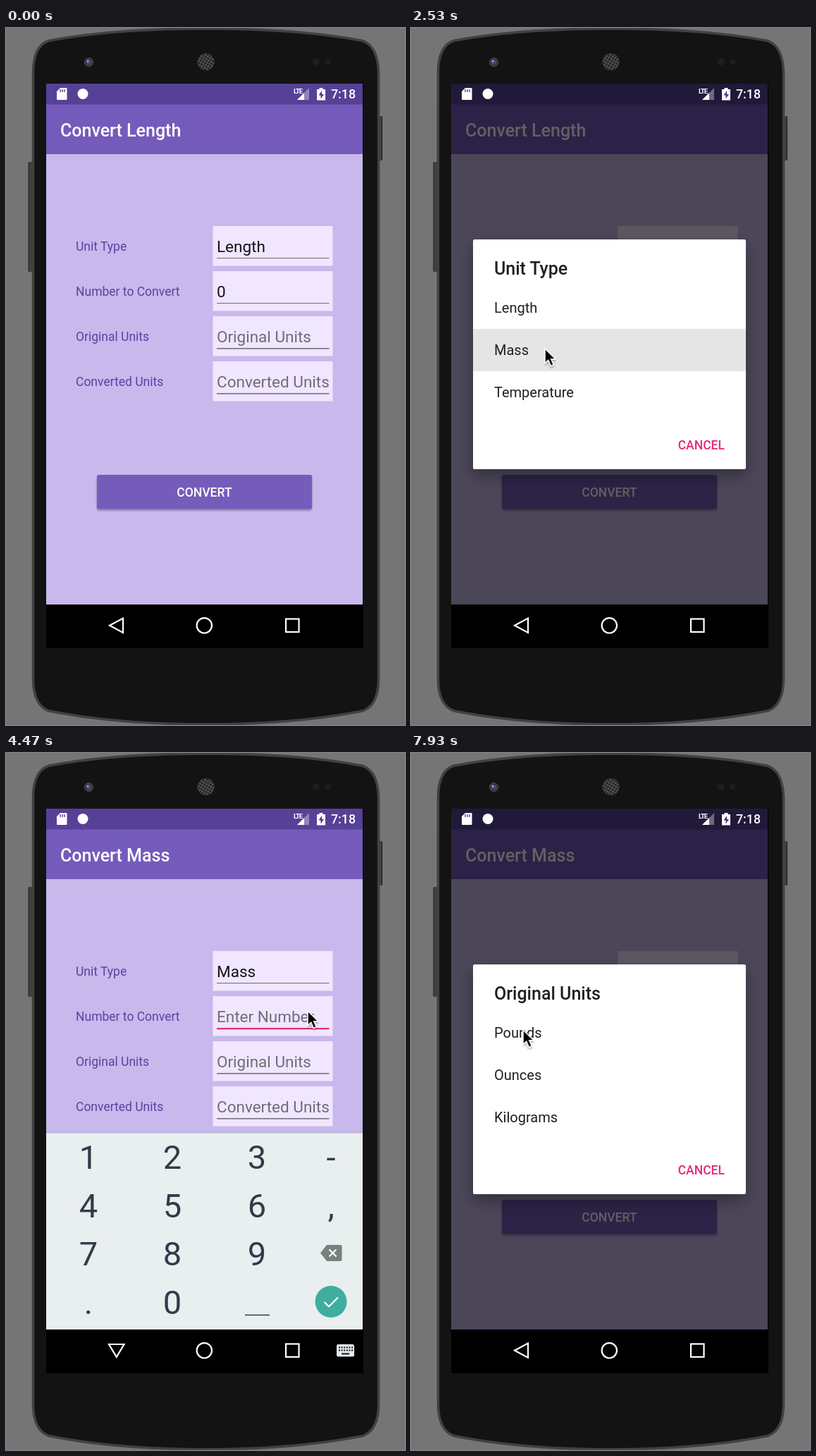
Recreate the animation shown at these times as an HTML page. Size 566 by 989 pixels, loop 8000 ms.

```html
<!DOCTYPE html>
<html lang="en">
<head>
<meta charset="utf-8">
<title>Unit converter</title>
<style>
  html, body { margin: 0; width: 100%; height: 100%; overflow: hidden; background: #757575; }
  svg { display: block; font-family: Roboto, sans-serif; }
  .medium { font-weight: 500; }
  .mid { text-anchor: middle; }
  .label { font-size: 17.5px; fill: #5a42a2; }
  .value { font-size: 22.5px; fill: #151418; }
  .hint { fill: #716c78; }
  .title { font-size: 25px; font-weight: 500; }
  .item { font-size: 20px; fill: #202020; }
  .button { font-size: 17.5px; font-weight: 500; }
  .key { font-size: 47px; fill: #303c4a; text-anchor: middle; }
  .line { fill: none; stroke: #fff; stroke-width: 2.2; }
</style>
</head>
<body>
<svg width="566" height="989" viewBox="0 0 566 989">
  <defs>
    <pattern id="mesh" width="4" height="4" patternUnits="userSpaceOnUse" patternTransform="rotate(30)">
      <rect width="4" height="4" fill="#4c4c4c"/><circle cx="2" cy="2" r="1.3" fill="#161616"/>
    </pattern>
    <linearGradient id="side"><stop stop-color="#25262a"/><stop offset=".5" stop-color="#4a4b50"/><stop offset="1" stop-color="#1d1d20"/></linearGradient>
    <filter id="lift" x="-20%" y="-20%" width="140%" height="150%"><feDropShadow dx="0" dy="10" stdDeviation="11" flood-opacity=".32"/></filter>
    <filter id="low" x="-5%" y="-20%" width="110%" height="150%"><feDropShadow dx="0" dy="2" stdDeviation="1.5" flood-opacity=".35"/></filter>
    <clipPath id="screen"><rect x="57" y="79" width="450" height="801"/></clipPath>
  </defs>

  <rect width="566" height="989" fill="#757575"/>
  <rect x="31.5" y="190" width="7" height="156" rx="1.5" fill="url(#side)"/>
  <rect x="528" y="125" width="6" height="63" rx="1.5" fill="url(#side)"/>
  <path d="M38.5 62Q39 25 61 18Q150 1 283 1T505 18Q527 25 528.5 62V925Q528 961 506 969Q410 988 283 988T61 969Q39 961 38.5 925Z" fill="#131313" stroke="#414141" stroke-width="3.5"/>
  <circle cx="117.500" cy="48.500" r="6" fill="#343438" stroke="#555" stroke-width="1"/>
  <circle cx="117.500" cy="48.500" r="3.500" fill="#4b4578"/><circle cx="116" cy="47" r="1.500" fill="#aaa6c8"/>
  <circle cx="283.500" cy="48" r="12" fill="url(#mesh)"/>
  <g fill="#211c1d"><circle cx="440" cy="48" r="5"/><circle cx="456" cy="48" r="4"/></g>

  <g clip-path="url(#screen)">
    <rect x="57" y="79" width="451" height="801"/>
    <rect x="57" y="79" width="449" height="739" fill="#c8b8ec"/>
    <rect x="57" y="79" width="449" height="30" fill="#564197"/>
    <rect x="57" y="108.500" width="449" height="70.500" fill="#745bbb"/>
    <text id="heading" class="title" x="77" y="153.500" fill="#fff"></text>
    <g id="form"></g>
    <rect x="129" y="634" width="305" height="48.500" rx="2.500" fill="#745bbb" filter="url(#low)"/>
    <text class="button mid" x="281.500" y="664.500" fill="#fff">CONVERT</text>
    <rect id="dim" x="57" y="79" width="449" height="739"/>

    <g fill="#fff">
      <path d="M77 85H85.500Q86.500 85 86.500 86V101Q86.500 102 85.500 102H73Q72 102 72 101V90Z"/>
      <path d="M77 87v4M80 87v4M83 87v4" stroke="#564197" stroke-width="1.400"/>
      <circle cx="109" cy="93.500" r="7.500"/>
      <text x="408" y="93" font-size="9.500" font-weight="700" letter-spacing="-1.200">LTE</text>
      <path d="M430 85V102H413Z" opacity=".35"/><path d="M423 92V102H413Z"/>
      <path d="M441 87H444.500V85H449.500V87H453V102.500H441Z"/>
      <path d="M448 89L443.500 95.500H446.500V100.500L451 94H448Z" fill="#493781"/>
      <text class="medium" x="461" y="100" font-size="17.800">7:18</text>
    </g>

    <g id="keyboard">
      <rect x="57" y="539" width="449" height="279" fill="#e9eeef"/>
      <rect x="57" y="538" width="449" height="1.500" fill="#b9b3cd"/>
      <g id="keys"></g>
      <path d="M339 797.500H374" stroke="#303c4a" stroke-width="1.500"/>
      <path d="M446 709.500L455 698H474.500Q476.500 698 476.500 700V719Q476.500 721 474.500 721H455Z" fill="#77827f"/>
      <path d="M458.500 704.500l10 10m0-10l-10 10" class="line"/>
      <circle cx="461" cy="778.500" r="22.500" fill="#3fada0"/>
      <path d="M451.500 779l6.500 6.500 13-13" class="line"/>
    </g>

    <g class="line">
      <path id="back"/>
      <circle cx="281.300" cy="847.800" r="10.700"/>
      <rect x="397" y="838.500" width="18.500" height="18.500"/>
    </g>
    <g id="switcher">
      <rect x="469" y="839" width="25" height="17.500" rx="2.500" fill="#e4e8ea"/>
      <path d="M472 843.500H492M472 847.500H492" stroke="#111" stroke-width="2" stroke-dasharray="2 1.600"/>
      <path d="M476 852.500H487" stroke="#111" stroke-width="2"/>
    </g>

    <g id="dialog">
      <rect x="88" y="300" width="387" height="326" rx="2.500" fill="#fff" filter="url(#lift)"/>
      <rect id="pressed" x="88" y="427" width="387" height="60" fill="#000"/>
      <g id="choices"></g>
      <text class="button" x="445" y="597.500" text-anchor="end" fill="#e22b77">CANCEL</text>
    </g>
  </g>

  <path id="pointer" d="M0 0V20.500L4.700 16.200 8.300 24.500 12.300 22.800 8.700 14.700H15Z" stroke="#fff" stroke-width="1.500" filter="url(#low)"/>
</svg>
<script>
const LOOP = 8000;
const $ = id => document.getElementById(id);
const clamp = v => Math.max(0, Math.min(1, v));
const ramp = (t, from, to) => clamp((t - from) / (to - from));
const smooth = u => u * u * (3 - 2 * u);
const within = (t, from, to) => t >= from && t < to;
const setText = (node, text) => { if (node.textContent !== text) node.textContent = text; };

$('form').innerHTML = ['Unit Type', 'Number to Convert', 'Original Units', 'Converted Units'].map((name, i) => {
  const y = 281 + 64 * i;
  return `<text class="label" x="99" y="${y + 35}">${name}</text>
    <rect x="293.5" y="${y}" width="170" height="56.500" fill="#f0e6ff"/>
    <text id="value${i}" class="value ${i > 1 ? 'hint' : ''}" x="299" y="${y + 37}">${i > 1 ? name : ''}</text>
    <rect id="rule${i}" x="299" y="${y + 45}" width="159.500" height="${i > 1 ? 1.6 : 1.1}" fill="#77717f"/>`;
}).join('') + '<rect id="caret" y="358" width="2.500" height="30" fill="#e22b77"/>';

$('keys').innerHTML = ['123-', '456,', '789', '.0'].map((row, r) => [...row].map((key, c) =>
  `<text class="key" x="${[117, 236, 356, 461][c]}" y="${590 + 68.7 * r}">${key}</text>`).join('')).join('');

$('choices').innerHTML = '<text class="title" x="118" y="349.500" fill="#202020"></text>' +
  [404, 464, 524].map(y => `<text class="item" x="118" y="${y}"></text>`).join('');

// Pointer stops: time, x, y
const stops = [
  [70, 330, 790], [870, 369, 307], [1700, 369, 307], [2330, 190, 455], [2600, 190, 455],
  [2900, 430, 384], [3000, 430, 384], [3400, 428, 366], [6530, 428, 366],
  [6950, 396, 434], [7400, 396, 434], [7860, 159, 393]
];

function pointerAt(t) {
  const next = stops.findIndex(s => s[0] > t);
  if (next < 0) return stops.at(-1).slice(1);
  const a = stops[Math.max(0, next - 1)], b = stops[next];
  const u = smooth(ramp(t, a[0], b[0]));
  return [1, 2].map(k => a[k] + (b[k] - a[k]) * u);
}

function draw(t) {
  const unit = t < 2650 ? 'Length' : 'Mass';
  setText($('heading'), 'Convert ' + unit);
  setText($('value0'), unit);

  const typed = t < 3560 ? '0' : t < 4670 ? '' : t < 6000 ? '1' : t < 6200 ? '10' : '100';
  const focused = within(t, 3560, 7000);
  setText($('value1'), typed || 'Enter Number');
  $('value1').classList.toggle('hint', !typed);
  $('rule1').setAttribute('fill', focused ? '#e22b77' : '#77717f');
  $('rule1').setAttribute('height', focused ? 2.2 : 1.1);
  const caretOn = within(t, 3900, 4470) || within(t, 4670, 5200) || within(t, 5730, 6700);
  $('caret').setAttribute('opacity', +caretOn);
  $('caret').setAttribute('x', 298.5 + typed.length * 12.6);

  const shown = smooth(ramp(t, 3850, 4150)), hidden = ramp(t, 7150, 7338);
  $('keyboard').setAttribute('opacity', shown * (1 - hidden));
  $('keyboard').setAttribute('transform', `translate(0 ${80 * (1 - shown + hidden)})`);
  const typing = within(t, 3850, 7220);
  $('back').setAttribute('d', typing ? 'M146 839H167.500L156.800 857Z' : 'M147 847.800L166 837.500V858Z');
  $('switcher').setAttribute('opacity', +typing);

  const second = t > 5000;
  const options = second ? ['Original Units', 'Pounds', 'Ounces', 'Kilograms']
                         : ['Unit Type', 'Length', 'Mass', 'Temperature'];
  options.forEach((text, i) => setText($('choices').children[i], text));
  $('dialog').setAttribute('opacity', second ? ramp(t, 7163, 7383) : ramp(t, 1320, 1540) - ramp(t, 2740, 2950));
  $('dim').setAttribute('opacity', 0.62 * (ramp(t, 1370, 1680) - ramp(t, 2830, 3070) + ramp(t, 7340, 7650)));
  $('pressed').setAttribute('opacity', 0.1 * (ramp(t, 2380, 2500) - ramp(t, 2600, 2750)));

  $('pointer').setAttribute('opacity', +(t >= 70));
  $('pointer').setAttribute('transform', `translate(${pointerAt(t)})`);
}

function tick() {
  draw(performance.now() % LOOP);
  requestAnimationFrame(tick);
}
tick();
</script>
</body>
</html>
```
